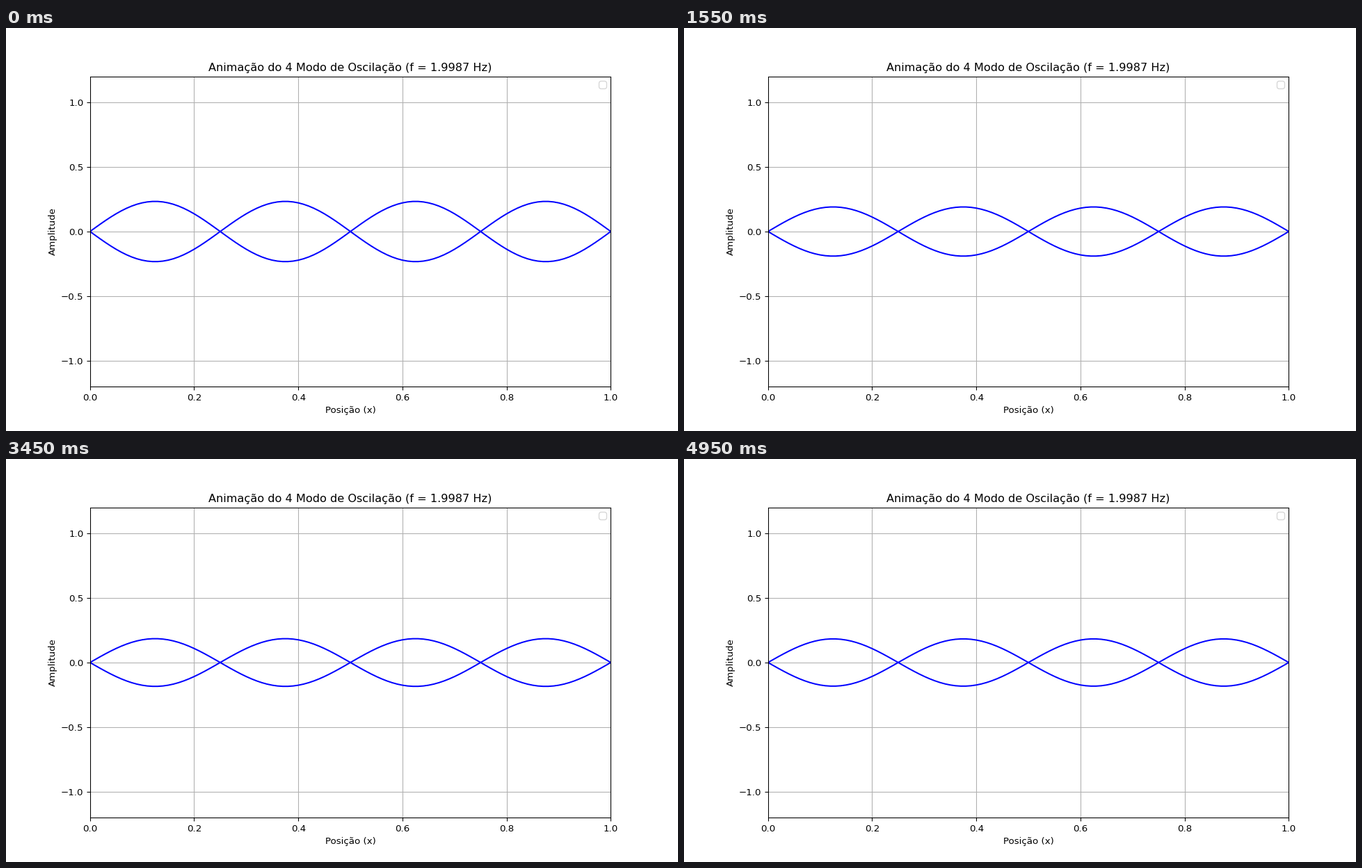
A matplotlib script for the animation above (5 s loop, 966 by 580 pixels).

```python
import numpy as np
import matplotlib.pyplot as plt
from matplotlib.animation import FuncAnimation

WIDTH, HEIGHT, DPI = 966, 580, 96.6
FRAMES, INTERVAL = 100, 50  # 5 s loop
MODE, FREQ, PEAK = 4, 1.9987, 0.233

plt.rcParams["font.family"] = "DejaVu Sans"

# the tiny margin keeps the pixel size from truncating downwards
fig, ax = plt.subplots(
    figsize=((WIDTH + 1e-4) / DPI, (HEIGHT + 1e-4) / DPI), dpi=DPI)

x = np.linspace(0, 1, 101)
shape = PEAK * np.sin(MODE * np.pi * x)
upper, = ax.plot(x, shape, color="blue", lw=1.5)
lower, = ax.plot(x, -shape, color="blue", lw=1.5)

ax.set_xlim(0, 1)
ax.set_ylim(-1.2, 1.2)
ax.set_xlabel("Posição (x)")
ax.set_ylabel("Amplitude")
ax.set_title(f"Animação do {MODE} Modo de Oscilação (f = {FREQ} Hz)")
ax.grid(True)
ax.legend([], [], loc="upper right")


def update(frame):
    t = frame * INTERVAL / 1000
    y = shape * np.cos(2 * np.pi * FREQ * t)
    upper.set_ydata(y)
    lower.set_ydata(-y)
    return upper, lower


anim = FuncAnimation(fig, update, frames=FRAMES, interval=INTERVAL,
                     repeat=True, repeat_delay=0)

plt.show()
```
